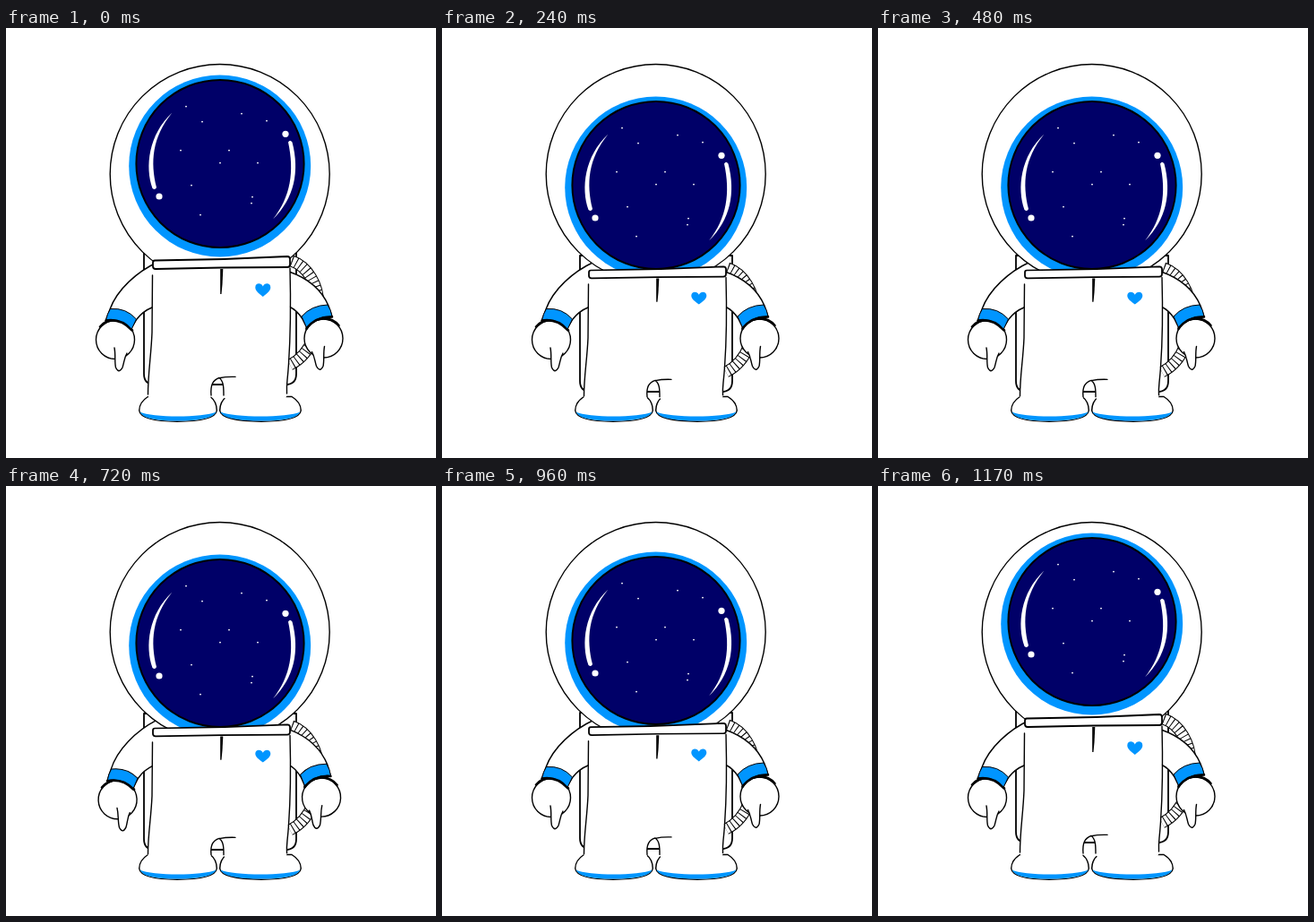
An HTML page for the animation above (1200 ms loop, 480x480 px).

```html
<!DOCTYPE html>
<html lang="en">
<head>
<meta charset="utf-8">
<title>Astronaut</title>
<style>
  html, body { margin: 0; width: 100%; height: 100%; overflow: hidden; background: #fff; }
  svg { display: block; width: 100vw; height: 100vh; }
  .o { fill: #fff; stroke: #000; stroke-width: 1.4; stroke-linejoin: round; stroke-linecap: round; }
  .l { fill: none; stroke: #000; stroke-width: 1.4; stroke-linecap: round; stroke-linejoin: round; }
  .m { stroke-width: 2.6; }
  .b { fill: #0095ff; }
  .w { fill: #fff; }
</style>
</head>
<body>
<svg viewBox="0 0 480 480">
  <defs>
    <path id="tube" d="M319 260C336 266 349 286 349 310S342 364 317 376"/>
    <g id="hand">
      <circle class="o" cx="122" cy="348" r="21.5"/>
      <path class="l m" d="M105 333.500A22 22 0 0 1 141 337.500"/>
      <path class="o" d="M121 357C122.500 365 121 372 122.500 379Q126 386.500 130 379C132 373 132 368 135 363"/>
    </g>
    <g id="foot">
      <path class="o" d="M158.500 411.500C151.500 416 148.700 421 148.700 427C150 436 168 439.200 191 439.200S234 436 235.300 427C235.300 420 232 414.500 228 411.500Z"/>
      <path class="b" d="M149.500 428.500C163 435.200 220 435.200 234.700 428.500C231 436 214 438.500 191 438.500S153 436 149.500 428.500Z"/>
    </g>
  </defs>

  <g id="pack">
    <path class="o" style="stroke-width:1.8" d="M154 246H324V386Q324 398 312 398H166Q154 398 154 386Z"/>
    <g fill="none">
      <use href="#tube" stroke="#000" stroke-width="13"/>
      <use href="#tube" stroke="#fff" stroke-width="11"/>
      <use href="#tube" stroke="#000" stroke-width="12" stroke-dasharray="1 4"/>
    </g>
  </g>

  <g id="armL">
    <path class="o" d="M170 261C146 272 124 292 116 314L111.500 326L139 337L146 325Q153 316 163 312"/>
    <use href="#hand"/>
    <path class="b" stroke="#000" d="M116.500 313.500Q134 312 145.500 325L140 336.500Q129 323.500 111.500 326Q113 319 116.500 313.500Z"/>
    <path class="l m" d="M111.500 326.500Q129 324 140 337"/>
  </g>
  <g id="armR">
    <path class="o" d="M316 272C339 280 353 294 360 310L364 322L336 335L331 325Q325 315 316 311"/>
    <use href="#hand" transform="matrix(-1 0 0 1 476.500 -1.500)"/>
    <path class="b" stroke="#000" d="M359 309Q341 309.500 330 322L335.500 334.500Q347 321 364 322Q363 315 359 309Z"/>
    <path class="l m" d="M364 322.500Q347 321.500 335.500 335"/>
  </g>

  <use href="#foot"/>
  <use href="#foot" transform="matrix(-1.046 0 0 1 484.800 0)"/>

  <circle class="o" cx="238.7" cy="163" r="122.5"/>
  <g id="visor">
    <circle class="b" cx="238.7" cy="154" r="101.5"/>
    <circle cx="239" cy="151.5" r="93.6" fill="#000068" stroke="#000" stroke-width="2"/>
    <g id="stars" class="w"></g>
    <path class="w" d="M185.500 94.500C159 119 155 155 163.500 179Q166.500 181.500 168 178C161 150 163 122 185.500 94.500Z"/>
    <circle class="w" cx="171" cy="188" r="3.6"/>
    <circle class="w" cx="312" cy="118.300" r="3.6"/>
    <path class="w" d="M315 127.500Q317 124 319.500 127.500C328 160 322 190 298 213.500C318 188 322 160 315 127.500Z"/>
  </g>

  <g id="torso">
    <path class="w" d="M164 262L163 340C162 366 158.500 385 158.500 410Q159 415 166 417H222Q229 415 229 410C228 398 231 393 238 390.500C243 394 243 402 243 410Q244 416 252 417H306Q313 415 313.500 409C313 390 318 350 317 262Z"/>
    <path class="l" d="M163.500 276L163 340C162 366 158.500 385 158.500 409M229 410C228 398 231 393 238 390.500C243 394 243 402 243 410M238 390.800Q246 389 256 389.400M317 268C318.500 325 317 352 315.500 375S313 395 313.500 408"/>
    <path d="M239.200 269H242.300L241.500 286L240.500 297H239.200Z"/>
    <path class="b" d="M286.800 300C282 296 278.300 293.500 278.300 289.500C278.300 284.300 285 284 286.800 288.500C288.600 284 295.300 284.300 295.300 289.500C295.300 293.500 291.600 296 286.800 300Z"/>
    <path class="o" style="stroke-width:1.8" d="M166 259.500Q240 259 314 255Q317 255 317 258V264Q317 267 314 267Q240 267 167 269Q164 269 164 266V262Q164 259.500 166 259.500Z"/>
  </g>
</svg>
<script>
const $ = id => document.getElementById(id);
const LOOP = 1200, STEP = 30;

const stars = [[201, 87], [219, 104], [263, 95], [291, 103], [195, 136], [249, 136],
  [239, 150], [281, 150], [207, 175], [275, 188], [274, 195], [217, 208]];
$('stars').innerHTML = stars.map(([x, y]) =>
  `<circle cx="${x}" cy="${y + 0.6}" r="0.95"/>`).join('');

// Piecewise linear value through [time, value] keys
function track(keys, t) {
  let [t0, v0] = keys[0];
  for (const [t1, v1] of keys) {
    if (t < t1) return v0 + (v1 - v0) * (t - t0) / (t1 - t0);
    [t0, v0] = [t1, v1];
  }
  return v0;
}

const crouch = [[0, 0], [240, 1], [930, 1], [1170, 0]];
const swing = [[0, 0], [240, 0], [360, 4.8], [480, 0], [600, 4.8], [720, -2.6], [840, 4.8], [960, 0]];

function move(id, value) { $(id).setAttribute('transform', value); }

function draw(t) {
  const c = track(crouch, t), a = track(swing, t);
  move('visor', `translate(0 ${24 * c})`);
  move('pack', `translate(0 ${8 * c})`);
  move('torso', `translate(0 436) scale(1 ${1 - 0.0625 * c}) translate(0 -436)`);
  move('armL', `rotate(${a} 174 292)`);
  move('armR', `rotate(${-0.8 * a} 322 280)`);
}

const start = performance.now();
function tick() {
  const t = (performance.now() - start) % LOOP;
  draw(Math.floor(t / STEP) * STEP);
  requestAnimationFrame(tick);
}
draw(0);
requestAnimationFrame(tick);
</script>
</body>
</html>
```
